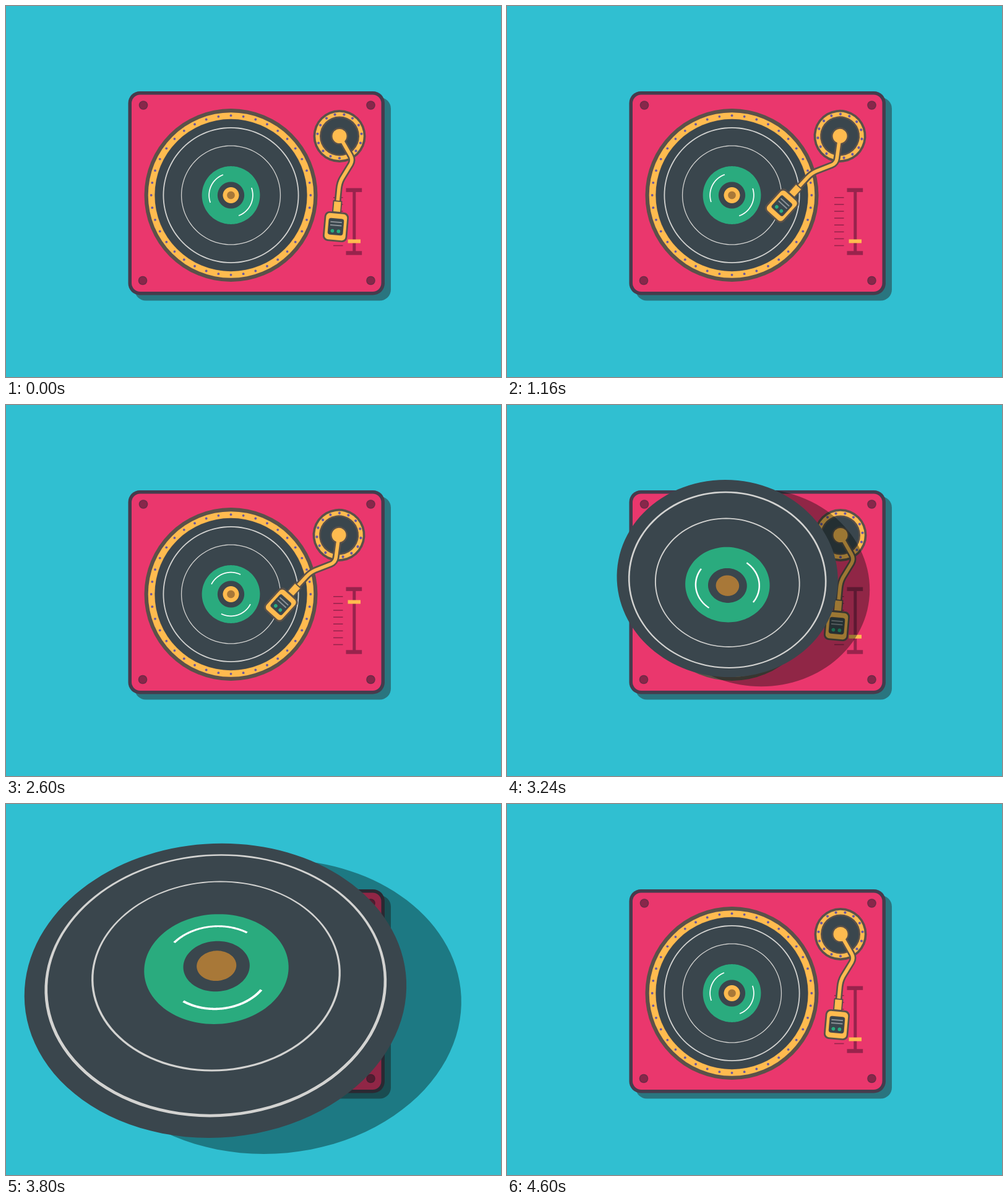
Recreate the animation shown at these times as an HTML page with a canvas. Size 800x600 px, loop 4640 ms.

```html
<!DOCTYPE html>
<html lang="en">
<head>
<meta charset="utf-8">
<title>Turntable</title>
<style>
  html, body { margin: 0; width: 100%; height: 100%; overflow: hidden; background: #30bfd1; }
  canvas { display: block; width: 800px; height: 600px; }
</style>
</head>
<body>
<canvas id="stage" width="800" height="600"></canvas>
<script>
const ctx = document.getElementById('stage').getContext('2d');
const LOOP = 4640, TAU = Math.PI * 2, RAD = Math.PI / 180;
const CAMERA = 1111;
const LAUNCH = 2980, PEAK = 3715, LAND = 4171;
const BG = '#30bfd1', PINK = '#ea376d', FRAME = '#453c4d', WINE = '#98234c';
const DARK = '#3a464d', YELLOW = '#ffbb4f', BROWN = '#5b5149', COPPER = '#a87838';
const GREEN = '#2aab7e', PURPLE = '#6a58a0', GROOVE = '#d3d3d1';

const clamp = v => Math.min(1, Math.max(0, v));
const ease = (t, from, to) => (1 - Math.cos(Math.PI * clamp((t - from) / (to - from)))) / 2;

function circle(x, y, r, color) {
  ctx.fillStyle = color;
  ctx.beginPath();
  ctx.arc(x, y, r, 0, TAU);
  ctx.fill();
}

function box(x, y, w, h, r, color) {
  ctx.fillStyle = color;
  ctx.beginPath();
  ctx.roundRect(x, y, w, h, r);
  ctx.fill();
}

const centredBox = (x, y, w, h, r, color) => box(x - w / 2, y - h / 2, w, h, r, color);

function dots(x, y, radius, count, size, phase) {
  for (let i = 0; i < count; i++) {
    const a = phase + i * TAU / count;
    circle(x + radius * Math.cos(a), y + radius * Math.sin(a), size, PURPLE);
  }
}

function drawDeck(slide) {
  box(208, 148, 414, 328.5, 18, '#2a757f');
  box(197.5, 138, 414.5, 329.5, 19, FRAME);
  box(203, 143.5, 403.5, 318.5, 14, PINK);
  for (const [x, y] of [[222, 160.5], [589.5, 160.5], [221, 444], [589.5, 444]]) {
    circle(x, y, 7.3, '#6f2b47');
    circle(x, y, 5.8, '#87274a');
  }

  circle(363.5, 306, 140, BROWN);
  circle(363.5, 306, 133.8, YELLOW);
  circle(363.5, 306, 123.2, BROWN);
  circle(363.5, 306, 122, DARK);
  circle(363.5, 306, 13, YELLOW);
  dots(363.5, 306, 128.8, 40, 1.9, 0);

  for (let i = 0; i < 8; i++) box(529, 309 + i * 11.1, 15.5, 1.6, 0, WINE);
  box(560.3, 298, 5, 101, 0, WINE);
  box(549.5, 294.5, 25.7, 6.4, 0, WINE);
  box(549.5, 396.3, 25.7, 6.4, 0, WINE);
  box(552.5, 377.5 - 62 * slide, 20.5, 6, 0, YELLOW);
}

function drawArm(angle) {
  ctx.save();
  ctx.translate(538.7, 209);
  ctx.rotate(angle);
  ctx.translate(-538.7, -209);

  circle(539, 210.5, 42.5, BROWN);
  circle(539, 210.5, 38.8, YELLOW);
  circle(539, 210.5, 32, BROWN);
  circle(539, 210.5, 29.5, DARK);
  dots(539, 210.5, 35.7, 15, 2.1, Math.PI / 2);
  circle(539, 210.5, 14, BROWN);

  const tube = new Path2D('M541 214L557 242Q561 249 557 256L543 279Q539 286 538 296L536 317');
  for (const [width, color] of [[11, BROWN], [5.6, YELLOW]]) {
    ctx.lineWidth = width;
    ctx.strokeStyle = color;
    ctx.stroke(tube);
  }
  circle(539, 210.5, 11.5, YELLOW);

  ctx.translate(533, 357);
  ctx.rotate(5 * RAD);
  centredBox(-.6, -32.5, 15, 20, 1, BROWN);
  centredBox(-.6, -32.5, 11, 16, 0, YELLOW);
  centredBox(0, 0, 39.5, 48, 8, BROWN);
  centredBox(0, 0, 34, 42.5, 6, YELLOW);
  centredBox(0, 0, 25, 27, 4, BROWN);
  centredBox(0, 0, 23, 25, 3, DARK);
  centredBox(0, -7.5, 18.5, 2, 0, '#8b9196');
  centredBox(0, -2.2, 18.5, 2, 0, '#8b9196');
  circle(-5, 7, 2.9, GREEN);
  circle(5, 7, 2.9, GREEN);
  ctx.restore();
}

function drawRecord(lift, flip, spin) {
  const scale = 1 + lift, cx = 363.5 - 15.7 * lift, cy = 306 - 30.2 * lift;

  // Vanishing point is the middle of the stage.
  function project(r, a) {
    const x = r * scale * Math.cos(a), y = r * scale * Math.sin(a);
    const f = CAMERA / (CAMERA + y * Math.sin(flip));
    return [400 + (cx + x - 400) * f, 300 + (cy + y * Math.cos(flip) - 300) * f];
  }

  function band(inner, outer, color, from = 0, to = TAU) {
    const steps = 120;
    ctx.fillStyle = color;
    ctx.beginPath();
    for (let i = 0; i <= steps; i++) ctx.lineTo(...project(outer, from + (to - from) * i / steps));
    for (let i = steps; i >= 0; i--) ctx.lineTo(...project(inner, from + (to - from) * i / steps));
    ctx.fill();
  }

  if (lift > 0) {
    const reach = lift ** .46;
    ctx.save();
    ctx.translate(74 * reach, 21.7 * reach);
    band(0, 122.5, 'rgba(0,12,9,.39)');
    ctx.restore();
  }
  band(0, 122.5, DARK);
  band(108.2, 110, GROOVE);
  band(79.3, 80.6, GROOVE);
  band(0, 46.9, GREEN);
  for (const side of [0, Math.PI]) {
    const mid = spin + side;
    band(34.5, 36.2, '#fff', mid - 44.5 * RAD, mid + 44.5 * RAD);
  }
  band(0, 21.6, DARK);
  band(0, 12.9, COPPER);
  ctx.globalAlpha = clamp(1 - lift * 8);
  band(6.3, 12.9, YELLOW);
  ctx.globalAlpha = 1;
}

// Cubic ease in and out, fastest at a third of the way.
function flipProgress(t) {
  const u = clamp((t - LAUNCH) / 1290), m = .33;
  return u < m ? u ** 3 / m ** 2 : 1 - (1 - u) ** 3 / (1 - m) ** 2;
}

function draw(t) {
  const swing = ease(t, 0, 820) - ease(t, 2800, 3200);
  const slide = ease(t, 1150, 1640) - ease(t, 2840, 3340);
  const lift = 1.62 * (ease(t, LAUNCH, PEAK) - ease(t, PEAK, LAND));
  const spin = (24.5 + t * 720 / 4600) * RAD;
  const record = () => drawRecord(lift, flipProgress(t) * TAU, spin);

  ctx.fillStyle = BG;
  ctx.fillRect(0, 0, 800, 600);
  drawDeck(slide);
  if (lift === 0) record();
  drawArm(swing * 37.4 * RAD);
  if (lift > 0) record();
}

const start = performance.now();
function tick() {
  draw((performance.now() - start) % LOOP);
  requestAnimationFrame(tick);
}
tick();
</script>
</body>
</html>
```
